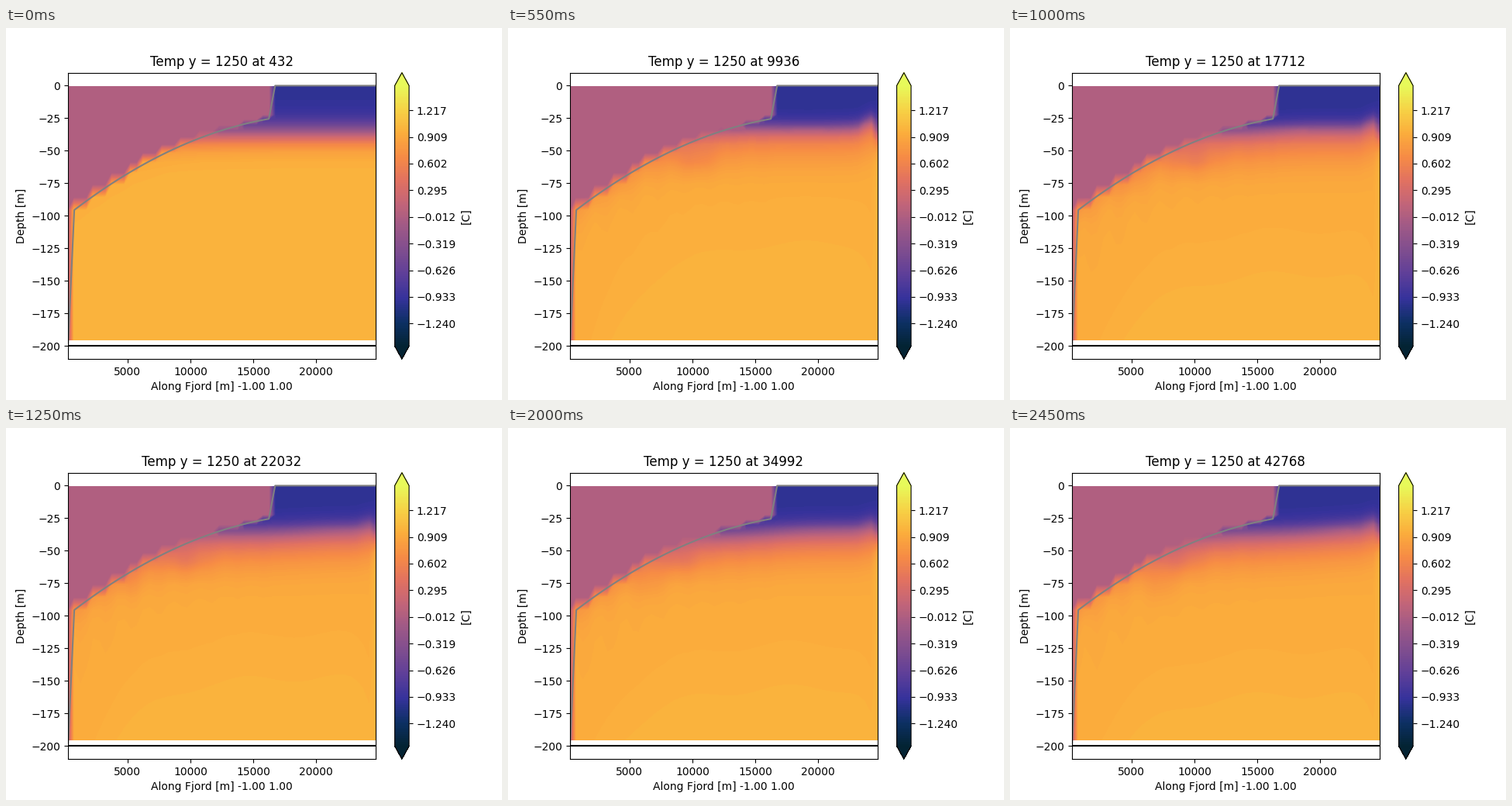
Recreate the animation shown at these times as a matplotlib script. Size 640 by 480 pixels, loop 2500 ms.

```python
import numpy as np
import matplotlib.pyplot as plt
from matplotlib.animation import FuncAnimation
from matplotlib.colors import LinearSegmentedColormap

FRAMES, INTERVAL = 50, 50
LEVELS = np.linspace(-1.5, 1.5, 128)
THERMAL = LinearSegmentedColormap.from_list("thermal", [
    "#032333", "#0d3064", "#35329b", "#5d3e99", "#7e4d8f", "#9e5987",
    "#c16479", "#e17161", "#f68b45", "#fbad3c", "#f6d346", "#e7fa5a"])

# Cell centres: 500 m columns, layers that thicken with depth down to 200 m
x = np.arange(250, 25000, 500.0)
dz = np.minimum(1.12 ** np.arange(33), 10)
dz *= 200 / dz.sum()
floor = np.cumsum(dz)
depth = floor - dz / 2
X, D = np.meshgrid(x, depth)

# Ice draft: wall on the left, curved shelf base, open water on the right
s = (x - 750) / 15500
draft = 95.5 - 114 * s + 44 * s**2
draft[0] = 200
draft[x > 16500] = 0

# A cell is ice unless a fair part of it is open; without a shelf none is
ICE = ((floor - 0.3 * dz)[:, None] <= draft) & (draft > 0)


def smooth(t):
    t = np.clip(t, 0, 1)
    return t * t * (3 - 2 * t)


def bump(t, centre, radius):
    return np.exp(-((t - centre) / radius)**2)


def temperature(n):
    stir = smooth(n / 15)     # mixing sets in
    surge = bump(n, 15, 5)    # passing rise of the thermocline
    age = n / FRAMES

    # Thermocline with a cool mixed layer beneath
    mid = (37 - 5 * surge - 3 * age * (X - 18000) / 6500
           - (3 * stir + 6 * surge) * bump(X, 24250, 700)
           + 0.5 * stir * np.sin(X / 1800 - 0.3 * n))
    u = D - mid
    T = np.tanh(u / (11 - 2.5 * stir - 4 * surge))
    T = np.where(u > 0, T * (1 - 0.42 * stir * bump(u, 0, 24)), T)

    # Meltwater hugging the shelf base, with small fingers
    below = np.clip(D - draft, 0, None)
    reach = 11 * (1 + 0.35 * stir * np.sin(X / 330 + 0.4 * n))
    melt = (0.05 + 0.14 * stir) * np.exp(-below / reach) * (draft > 0)
    T = np.where(T > 0, T * (1 - melt), T)

    # Slightly cooler water above the domed warm core
    core = (45 + 70 * stir + 27 * age
            + (60 + 90 * np.exp(-n / 10)) * np.exp(-(X - 3000) / 3500)
            + 45 * np.exp((X - 24750) / 700)
            + 3 * stir * np.sin(X / 1300 + 0.25 * n))
    T -= 0.065 * stir * (u > 0) / (1 + np.exp((D - core) / 22))

    # Two cool eddies drifting below the shelf
    T -= 0.17 * stir * bump(X, 10800 - 45 * n, 1700) * bump(D, 58, 10)
    T -= 0.09 * stir * bump(X, 3000 + 90 * n, 1000) * bump(D, 66 + 10 * age, 13)

    # The open boundary keeps the initial profile
    T[:, -1] = np.tanh((depth - 37) / 11)
    T[ICE] = 0
    return T


def fill(n):
    return ax.contourf(x, -depth, temperature(n), LEVELS,
                       cmap=THERMAL, extend="both")


fig, ax = plt.subplots(figsize=(6.4, 4.8), dpi=100)
field = fill(0)
fig.colorbar(field, ax=ax, label="[C]")
ax.plot(x, -draft, color="grey")
ax.plot(x, np.full_like(x, -200), color="black")
ax.set(xlim=(x[0], x[-1]), ylim=(-210, 10),
       xlabel="Along Fjord [m] -1.00 1.00", ylabel="Depth [m]")
title = ax.set_title("")


def update(n):
    global field
    field.remove()
    field = fill(n)
    title.set_text(f"Temp y = 1250 at {432 + 864 * n}")
    return field, title


anim = FuncAnimation(fig, update, frames=FRAMES, interval=INTERVAL,
                     init_func=lambda: (), repeat=True, repeat_delay=0)
plt.show()
```
